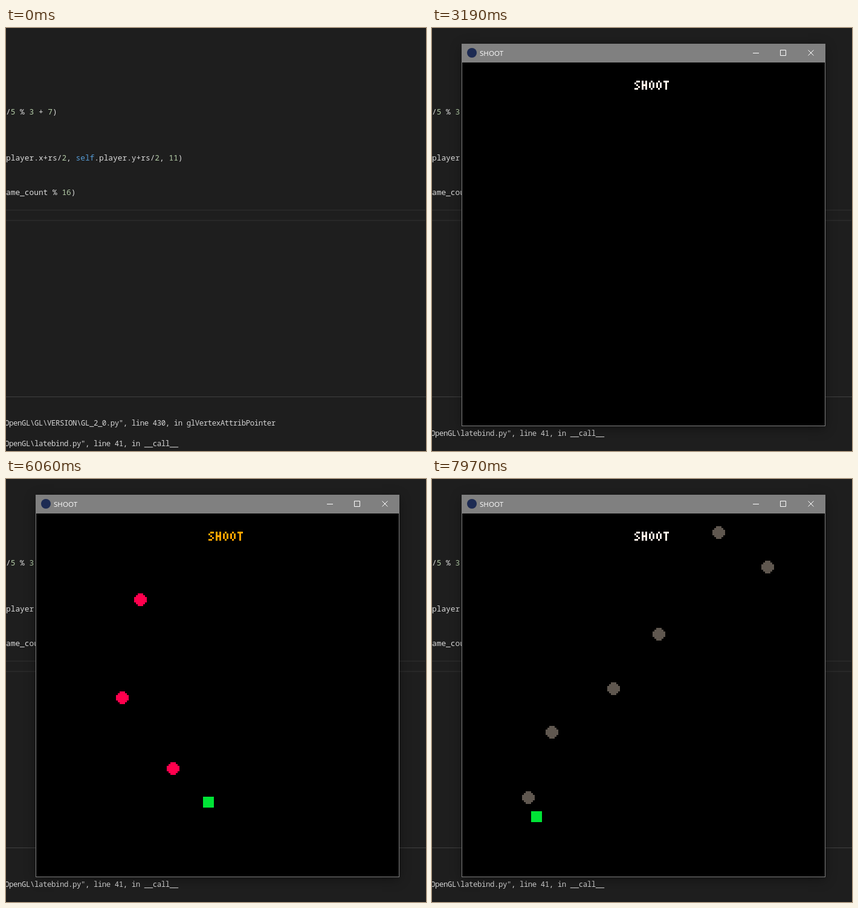
Write an HTML page with a canvas that moves like this. It is 695 px wide and 699 px high and loops after 8 s.

```html
<!DOCTYPE html>
<html lang="en">
<head>
<meta charset="utf-8">
<title>Shoot</title>
<style>
  html, body { margin: 0; width: 100%; height: 100%; overflow: hidden; background: #1e1e1e; }
  #stage { position: absolute; left: 0; top: 0; width: 695px; height: 699px; overflow: hidden; }
  svg { position: absolute; left: 0; top: 0; display: block; }
  .code { font: 500 12.83px "Noto Sans Mono", "DejaVu Sans Mono", monospace; fill: #dcdcdc; }
  .num { fill: #b5cea8; }
  .self { fill: #569cd6; }
  .term { font: 500 12.4px "Noto Sans Mono", "DejaVu Sans Mono", monospace; letter-spacing: -.44px; fill: #d4d4d4; }
  .caption { font: 11.6px "Open Sans", "Noto Sans", sans-serif; fill: #fff; }
  .label { font: 10.2px "Liberation Sans", sans-serif; fill: #000; }
  .kana { font: 10px "Noto Sans CJK JP", "Noto Sans CJK", sans-serif; letter-spacing: -1.5px; fill: #000; }
  #dialog { filter: drop-shadow(0 1px 3px rgba(0, 0, 0, .5)); transform-origin: 348.5px 332.5px; }
  #win { position: absolute; left: 49px; top: 26px; width: 602px; height: 632px;
    background: #808080; box-shadow: 0 4px 18px -1px rgba(0, 0, 0, .42); }
  #game { position: absolute; left: 1px; top: 31px; width: 600px; height: 600px;
    background: #000; image-rendering: pixelated; }
</style>
</head>
<body>
<div id="stage">
  <svg width="695" height="699">
    <g fill="#282828">
      <rect y="300" width="694" height="2"/>
      <rect y="317" width="694" height="2"/>
    </g>
    <rect y="609" width="695" height="1" fill="#404040"/>
    <g class="code">
      <text x="0" y="143">/<tspan class="num">5</tspan> % <tspan class="num">3</tspan> + <tspan class="num">7</tspan>)</text>
      <text x="0" y="219">player.x+rs/<tspan class="num">2</tspan>, <tspan class="self">self</tspan>.player.y+rs/<tspan class="num">2</tspan>, <tspan class="num">11</tspan>)</text>
      <text x="0" y="276">ame_count % <tspan class="num">16</tspan>)</text>
    </g>
    <g class="term">
      <text id="trace" x="-2" y="657">OpenGL\GL\VERSION\GL_2_0.py", line 430, in glVertexAttribPointer</text>
      <text id="last" x="-2" y="691">OpenGL\latebind.py", line 41, in __call__</text>
    </g>
    <g id="dialog">
      <rect x="213" y="276" width="271" height="113" fill="#808080"/>
      <rect x="214" y="306" width="269" height="82" fill="#f0f0f0"/>
      <text class="caption" x="221" y="296">Compact Fast Buffer Audio Layer</text>
      <text class="kana" x="257" y="324">ヘッドセット マイク</text>
      <text class="label" x="338" y="324">(Tovik Sardel 7.1 V2)</text>
      <text class="label" x="347.5" y="342" text-anchor="middle">Checking 2 Channels, 48000 SPS, 16 BPS ...</text>
      <rect x="220.5" y="358.5" width="257" height="21" fill="#e6e6e6" stroke="#bcbcbc"/>
      <rect x="220" y="359" width="3" height="20" fill="#06b025"/>
    </g>
  </svg>
  <div id="win">
    <svg width="602" height="31">
      <circle cx="17" cy="15" r="8" fill="#1d2b53"/>
      <text class="caption" x="30" y="20">SHOOT</text>
      <path d="M482 15.5h10M527.5 10.5h9v9h-9zM573.5 10.5l9 9M582.5 10.5l-9 9" fill="none" stroke="#fff"/>
    </svg>
    <canvas id="game" width="200" height="200"></canvas>
  </div>
</div>
<script>
const LOOP = 8000, SCROLL = 500, FLASH = 1390, OPEN = 2740;
const $ = id => document.getElementById(id);
const ctx = $("game").getContext("2d");

const PALETTE = ("000000 1d2b53 7e2553 008751 ab5236 5f574f c2c3c7 fff1e8 " +
  "ff004d ffa300 ffec27 00e436 29adff 83769c ff77a8 ffccaa").split(" ").map(c => "#" + c);

// 3 x 5 glyphs, one octal digit per row
const GLYPHS = { S: "34216", H: "55755", O: "25552", T: "72222" };

// player key points: tick, x, y; after the entry each one fires a ball
const PATH = [[27, 112, 201], [38, 89, 139], [50, 89, 139], [69, 55, 153], [86, 45, 156],
  [98, 73, 159], [108, 106, 154], [118, 139, 152], [124, 166, 153], [135, 106, 157],
  [145, 81, 157], [152, 47, 160], [163, 34, 163], [168, 47, 166]];
const SHOTS = PATH.slice(2).map(p => p[0]);

// the game runs slightly faster in its second half
const tickAt = t => Math.floor(87.03 + (t - 5510) * (t < 5510 ? .031 : .0317));

function slope(i, axis) {
  const a = PATH[i], b = PATH[i + 1];
  return a && b ? (b[axis] - a[axis]) / (b[0] - a[0]) : 0;
}

function tangent(i, axis) {
  const a = slope(i - 1, axis), b = slope(i, axis);
  return a * b > 0 ? 2 * a * b / (a + b) : 0;
}

// monotone cubic through the key points
function along(tick, axis) {
  let i = 0;
  while (i < PATH.length - 2 && tick >= PATH[i + 1][0]) i++;
  const a = PATH[i], b = PATH[i + 1], h = b[0] - a[0];
  const u = Math.max(0, Math.min(1, (tick - a[0]) / h)), w = 1 - u;
  return Math.floor(
    a[axis] * w * w * (1 + 2 * u) + b[axis] * u * u * (3 - 2 * u) +
    h * u * w * (tangent(i, axis) * w - tangent(i + 1, axis) * u));
}

function drawWord(word, x, y) {
  [...word].forEach((ch, n) => [...GLYPHS[ch]].forEach((row, r) => {
    for (let c = 0; c < 3; c++)
      if (row & (4 >> c)) ctx.fillRect(x + n * 4 + c, y + r, 1, 1);
  }));
}

function drawBall(x, y) {
  for (let r = -3; r <= 3; r++) {
    const half = Math.min(3, 4 - Math.abs(r));
    ctx.fillRect(x - half, y + r, half * 2 + 1, 1);
  }
}

function drawGame(tick) {
  ctx.fillStyle = PALETTE[0];
  ctx.fillRect(0, 0, 200, 200);
  ctx.fillStyle = PALETTE[Math.floor(tick / 5) % 3 + 7];
  drawWord("SHOOT", 95, 10);
  ctx.fillStyle = PALETTE[11];
  ctx.fillRect(along(tick, 1), along(tick, 2), 6, 6);
  ctx.fillStyle = PALETTE[tick % 16];
  for (const s of SHOTS)
    if (tick >= s) drawBall(along(s, 1) + 2, along(s, 2) + 2 - 3 * (tick - s + 1));
}

function drawDialog(t) {
  const p = (t - FLASH) / 160, dialog = $("dialog").style;
  dialog.display = p >= 0 && p < 1 ? "" : "none";
  dialog.opacity = .29 * (1 - p) * (1 + 2 * p);
  dialog.transform = p > .1 ? `scale(${1 - .03 * p * p})` : "none";
}

function drawWindow(t) {
  const win = $("win").style;
  win.display = t < OPEN ? "none" : "";
  if (t < OPEN) return;
  const p = Math.min(1, (t - OPEN + 30) / 240), ease = 1 - (1 - p) ** 3;
  win.opacity = ease;
  win.transform = p < 1 ? `scale(${.9 + .1 * ease})` : "none";
  drawGame(tickAt(t));
}

function render(t) {
  const scrolled = t >= SCROLL;
  $("trace").style.display = scrolled ? "none" : "";
  $("last").setAttribute("y", scrolled ? 674 : 691);
  drawDialog(t);
  drawWindow(t);
}

function loop() {
  render(performance.now() % LOOP);
  requestAnimationFrame(loop);
}
loop();
</script>
</body>
</html>
```
